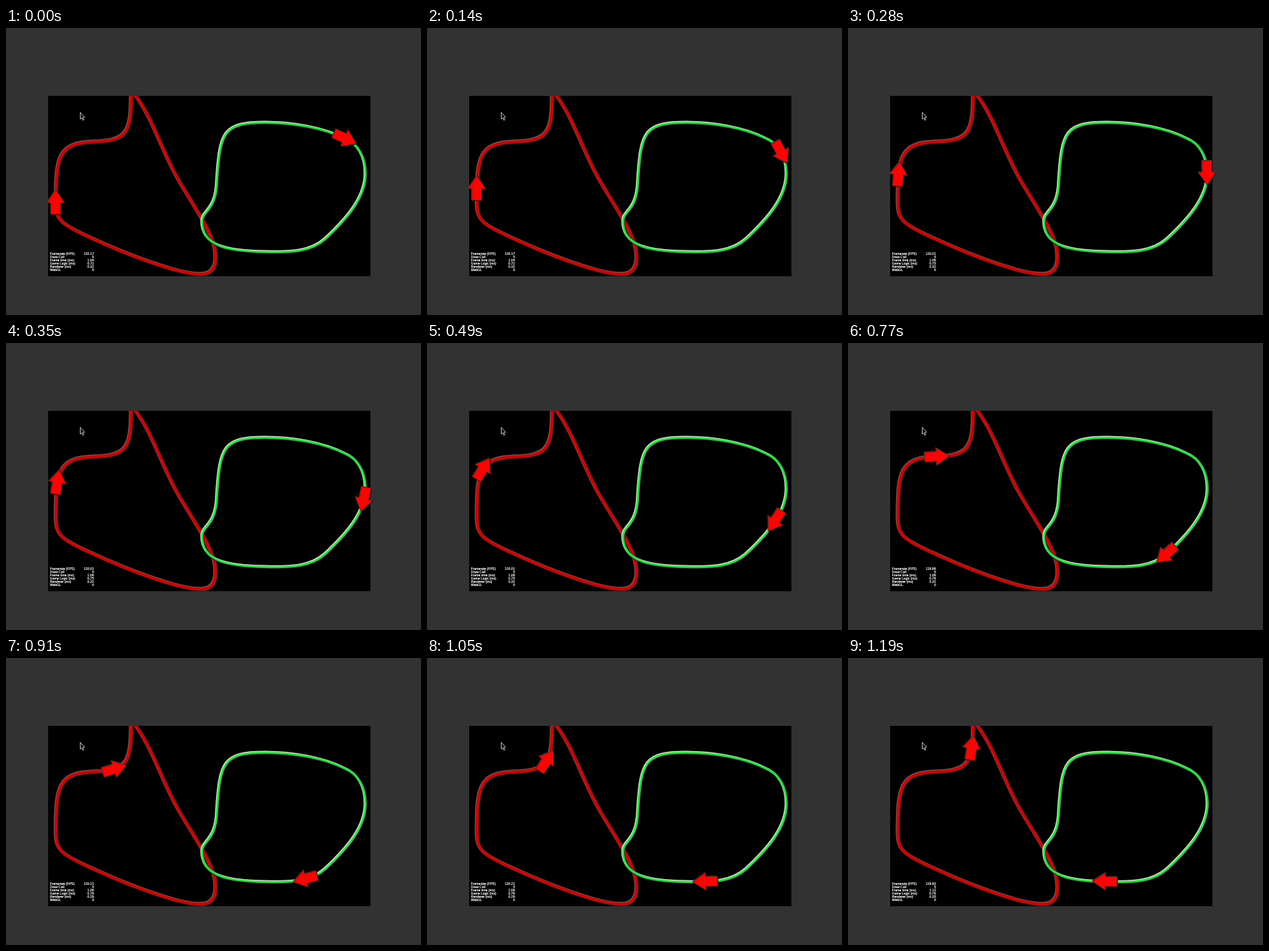
An HTML page with a canvas that plays this animation: 640 px wide and 444 px high, repeating every 1.26 s.

```html
<!DOCTYPE html>
<html lang="en">
<head>
<meta charset="utf-8">
<title>Arrows on two tracks</title>
<style>
html, body { margin: 0; height: 100%; overflow: hidden; background: #323232; }
canvas { display: block; }
</style>
</head>
<body>
<canvas id="stage" width="640" height="444"></canvas>
<script>
const ctx = document.getElementById('stage').getContext('2d');
const LOOP = 1260, STEP = 70, STATS_STEP = 280;

// Each track starts where its arrow starts; legs are [time, distance along the track].
const red = track(`M77 270 C77 200 80 178 135 176 C185 174 193 165 193 104 V96
  M196 100 C225 135 240 190 266 235 C292 280 323 322 323 352 C325 386 302 385 260 374
  C215 361 175 345 132 325 C85 304 77 297 77 270`,
  [[0, 0], [560, 87], [910, 163], [1190, 206]]);
const green = track(`M523 171 C543 179 554 200 554 225 C554 262 526 294 492 326
  C470 346 440 347 400 346 C345 345 302 339 302 299 C302 281 324 284 325 235
  C330 160 335 146 400 146 C442 146 490 154 523 171`,
  [[0, 0], [280, 65], [630, 156], [1190, 288]]);

const arrowShape = new Path2D('M18.5 0 L0 -12.5 V-7 H-18 V7 H0 V12.5 Z');
const cursor = new Path2D('M114.5 130.5 V141 L116.8 139 L118.4 142.8 L120 142 L118.4 138.5 L121.3 138 Z');

const stats = {
  'Framerate (FPS)': ['120.17', '120.01', '119.86', '120.21', '119.93'],
  'Draw Call': ['5'],
  'Frame time (ms)': ['1.04', '1.06', '1.06', '1.06', '1.13'],
  'Game Logic (ms)': ['0.72', '0.75', '0.76'],
  'Renderer (ms)': ['0.32', '0.32', '0.32', '0.29', '0.35'],
  'WebGL': ['0']
};

function track(d, legs) {
  const guide = document.createElementNS('http://www.w3.org/2000/svg', 'path');
  guide.setAttribute('d', d);
  return { path: new Path2D(d), guide, legs };
}

function distance(legs, t) {
  const i = legs.findIndex(leg => leg[0] > t);
  const [t1, d1] = legs.at(i), [t0, d0] = legs.at(i < 0 ? -2 : i - 1);
  return d0 + (d1 - d0) * (t - t0) / (t1 - t0);
}

function line(path, color, width, shift = 0) {
  ctx.save();
  ctx.translate(shift, shift);
  ctx.strokeStyle = color;
  ctx.lineWidth = width;
  ctx.stroke(path);
  ctx.restore();
}

function arrow({ guide, legs }, t) {
  const d = distance(legs, t);
  const at = guide.getPointAtLength(d);
  const a = guide.getPointAtLength(Math.max(0, d - 4)), b = guide.getPointAtLength(d + 4);
  const angle = Math.atan2(b.y - a.y, b.x - a.x);
  const layer = (shift, color, edge) => {
    ctx.save();
    ctx.translate(at.x + shift, at.y + shift);
    ctx.rotate(angle);
    ctx.fillStyle = color;
    ctx.fill(arrowShape);
    if (edge) line(arrowShape, color, edge);
    ctx.restore();
  };
  layer(0.4, '#5a0606', 2.4);
  layer(-1, '#523232', 1.6);
  layer(0, '#fb0404');
}

function tracks() {
  ctx.save();
  ctx.beginPath();
  ctx.rect(65, 105, 497, 279);
  ctx.clip();
  ctx.fillStyle = '#000';
  ctx.fill();
  ctx.filter = 'blur(0.5px)';
  line(red.path, '#4a0404', 7, 0.4);
  line(red.path, '#665454', 4.8, -1);
  line(red.path, '#bd0a0a', 4.6, 0.3);
  line(green.path, '#0a4010', 5.5, 0.4);
  line(green.path, '#c4d2c0', 3.2, -0.8);
  line(green.path, '#2fd844', 2.8, 0.6);
  ctx.restore();
}

function panel(index) {
  ctx.font = '5.1px "Liberation Sans", Arial, sans-serif';
  ctx.fillStyle = ctx.strokeStyle = '#fff';
  ctx.lineWidth = 0.2;
  const put = (text, x, y, align) => {
    ctx.textAlign = align;
    ctx.fillText(text, x, y);
    ctx.strokeText(text, x, y);
  };
  Object.entries(stats).forEach(([label, values], i) => {
    const y = 350.5 + i * 5.1;
    put(label, 67.7, y, 'left');
    put(values[index] ?? values.at(-1), 135.5, y, 'right');
  });
}

function draw(now) {
  const t = Math.floor(now % LOOP / STEP) * STEP;
  ctx.fillStyle = '#323232';
  ctx.fillRect(0, 0, 640, 444);
  tracks();
  ctx.filter = 'blur(0.4px)';
  arrow(red, t);
  arrow(green, t);
  ctx.filter = 'none';
  panel(Math.floor(t / STATS_STEP));
  ctx.fillStyle = '#111';
  ctx.fill(cursor);
  line(cursor, '#c4c4c4', 1);
}

let start;
function frame(now) {
  start ??= now;
  draw(now - start);
  requestAnimationFrame(frame);
}
draw(0);
requestAnimationFrame(frame);
</script>
</body>
</html>
```
